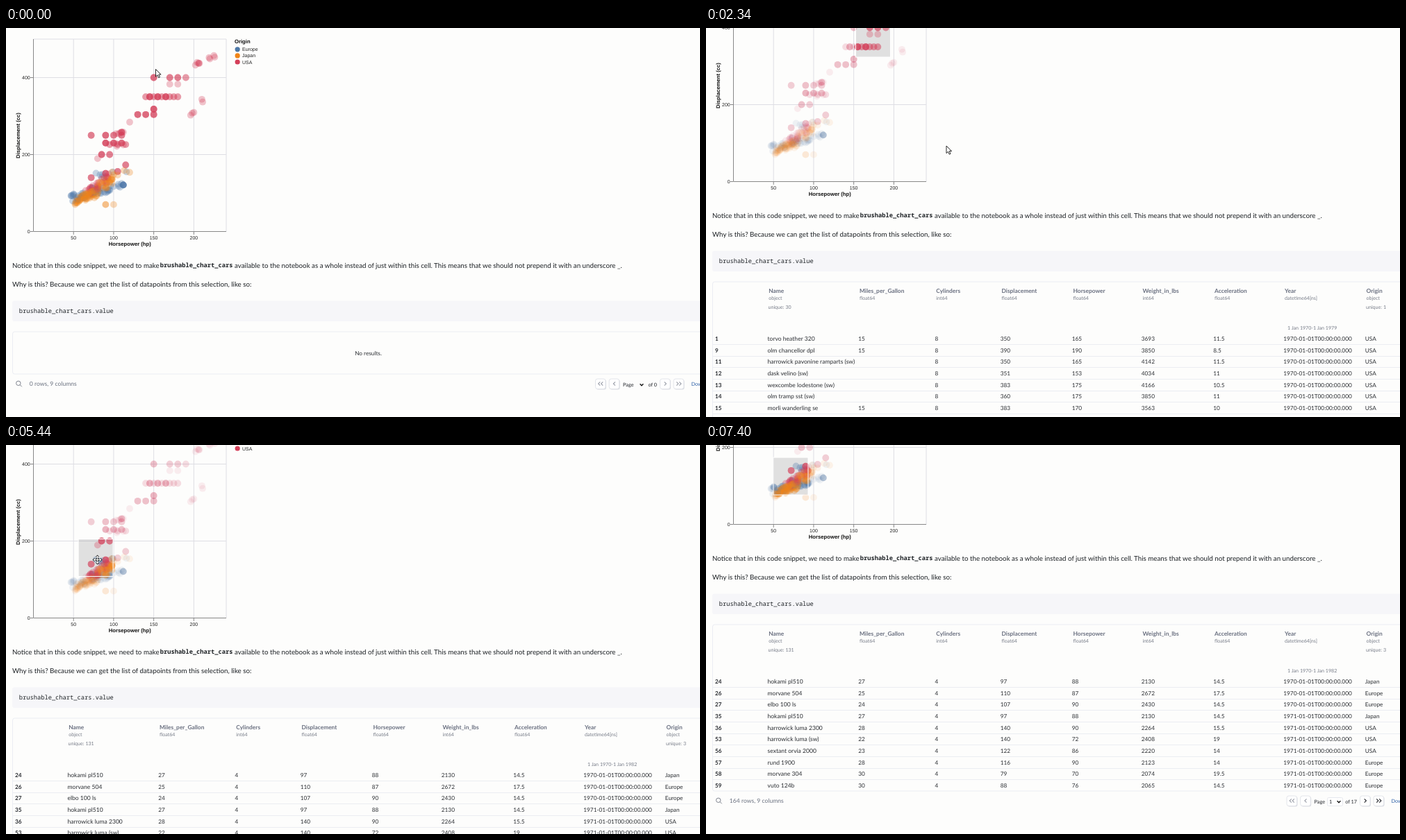
Recreate the animation shown at these times as an HTML page. Size 999 by 561 pixels, loop 7.47 s.

```html
<!DOCTYPE html>
<html lang="en">
<head>
<meta charset="utf-8">
<title>Brushable chart</title>
<style>
  html, body { margin: 0; width: 100%; height: 100%; overflow: hidden; background: #fdfdfc; }
  svg { display: block; }
  text { font-family: Lato, sans-serif; font-size: 8.55px; fill: #2b2e33; white-space: pre; text-rendering: geometricPrecision; }
  .para { font-size: 9.77px; fill: #1c2024; }
  .code { font-family: "Noto Sans Mono", monospace; font-size: 8.72px; fill: #1c2024; }
  .head { font-size: 8.4px; font-weight: bold; fill: #6a7080; }
  .sub { font-size: 7.1px; fill: #777c88; }
  .num { font-size: 8.25px; }
  .bold { font-weight: bold; }
  .foot { font-size: 8.6px; fill: #6b7280; }
  .page { font-size: 7.3px; fill: #22252b; }
  .link { fill: #2f62a8; }
  .axis { font-family: "Liberation Sans", Arial, sans-serif; font-size: 7px; fill: #222; }
  .title { font-family: "Liberation Sans", Arial, sans-serif; font-size: 7.7px; font-weight: bold; fill: #111; }
  .mid { text-anchor: middle; }
  .end { text-anchor: end; }
</style>
</head>
<body>
<svg id="stage" width="999" height="561" viewBox="0 0 999 561"></svg>
<script>
const LOOP = 7470;
const COLORS = { Europe: '#4c78a8', Japan: '#f08519', USA: '#d43f59' };

function el(parent, tag, attrs = {}, text) {
  const node = document.createElementNS('http://www.w3.org/2000/svg', tag);
  for (const key in attrs) node.setAttribute(key, attrs[key]);
  if (text !== undefined) node.textContent = text;
  parent.appendChild(node);
  return node;
}
const label = (parent, x, y, cls, text) => el(parent, 'text', { x, y, class: cls }, text);
const line = (parent, d, stroke, width = 1) =>
  el(parent, 'path', { d, stroke, fill: 'none', 'stroke-width': width });

const stage = document.getElementById('stage');
const page = el(stage, 'g');

// Chart
const px = hp => 39.5 + hp * 1.1545;
const py = cc => 293.5 - cc * 0.555;

for (let hp = 50; hp <= 200; hp += 50) {
  const x = px(hp);
  line(page, `M${x} 16V293`, '#dedee4');
  line(page, `M${x} 294V298`, '#888');
  label(page, x, 304.5, 'axis mid', hp);
}
for (let cc = 0; cc <= 400; cc += 200) {
  const y = py(cc);
  if (cc) line(page, `M40 ${y}H317`, '#dedee4');
  line(page, `M35 ${y}H39`, '#888');
  label(page, 34.7, y + 2.5, 'axis end', cc);
}
line(page, 'M39.5 16H317V293.5', '#dedee4');
line(page, 'M39.5 16V293.5H317', '#888');
label(page, 178.3, 314, 'title mid', 'Horsepower (hp)');
el(page, 'text', { class: 'title mid', transform: 'translate(19.5 155) rotate(-90)' }, 'Displacement (cc)');
label(page, 329, 22.3, 'title', 'Origin');
Object.keys(COLORS).forEach((name, i) => {
  const y = 30.8 + i * 9.1;
  el(page, 'circle', { cx: 333.2, cy: y, r: 3.6, fill: COLORS[name] });
  label(page, 340, y + 2.5, 'axis', name);
});

let seed = 20;
function random() {
  seed = (seed + 0x6d2b79f5) | 0;
  let v = Math.imul(seed ^ (seed >>> 15), 1 | seed);
  v ^= v + Math.imul(v ^ (v >>> 7), 61 | v);
  return ((v ^ (v >>> 14)) >>> 0) / 4294967296;
}

const points = [];
function add(origin, hp, cc) {
  points.push({ origin, x: px(hp), y: py(cc), order: random() + (origin === 'Japan' ? 0.3 : 0) });
}
// Engines of one size, stacked at regular power steps
function band(origin, count, cc, from, to = from) {
  const step = to - from > 25 ? 5 : 10;
  const stops = Math.floor((to - from) / step) + 1;
  for (let i = 0; i < count; i++) add(origin, from + step * (i % stops), cc);
}
// Loose scatter along a rising diagonal
function cloud(origin, count, hp0, hp1, cc0, cc1, spread) {
  for (let i = 0; i < count; i++) {
    const u = random();
    add(origin, Math.round(hp0 + (hp1 - hp0) * u), cc0 + (cc1 - cc0) * u + (random() - 0.5) * spread);
  }
}
cloud('USA', 9, 198, 227, 430, 456, 8);
cloud('USA', 5, 193, 215, 303, 345, 20);
cloud('USA', 9, 80, 125, 195, 268, 50);
cloud('USA', 36, 64, 94, 92, 142, 28);
band('USA', 4, 400, 150);
band('USA', 8, 400, 170, 190);
band('USA', 2, 383, 170, 180);
band('USA', 18, 350, 140, 180);
band('USA', 9, 350, 145, 165);
band('USA', 5, 318, 150);
band('USA', 12, 304, 130, 150);
band('USA', 4, 258, 110);
band('USA', 3, 250, 72);
band('USA', 10, 250, 90, 110);
band('USA', 13, 230, 90, 110);
band('USA', 6, 226, 95, 115);
band('USA', 7, 200, 85, 95);
band('USA', 3, 173, 115);
band('USA', 3, 156, 105);
band('USA', 4, 151, 90);
band('USA', 3, 140, 72);
band('Europe', 6, 121, 112);
cloud('Europe', 22, 46, 82, 88, 100, 20);
cloud('Europe', 20, 70, 112, 98, 126, 28);
cloud('Europe', 6, 67, 133, 143, 166, 16);
band('Japan', 3, 70, 90, 100);
cloud('Japan', 48, 52, 76, 78, 100, 18);
cloud('Japan', 32, 72, 98, 96, 138, 34);
cloud('Japan', 5, 98, 132, 145, 168, 14);
points.sort((a, b) => a.order - b.order);

const brushFill = el(page, 'rect', { fill: '#333', 'fill-opacity': 0.14 });
for (const p of points)
  p.node = el(page, 'circle', { cx: p.x, cy: p.y, r: 4.9, fill: COLORS[p.origin] });
const brushEdge = el(page, 'rect', { fill: 'none', stroke: '#fff' });

// Notebook text
label(page, 9, 345.5, 'para', 'Notice that in this code snippet, we need to make');
label(page, 221.8, 345.3, 'code bold', 'brushable_chart_cars');
label(page, 329, 345.5, 'para', 'available to the notebook as a whole instead of just within this cell. This means that we should not prepend it with an underscore _.');
label(page, 9, 373, 'para', 'Why is this? Because we can get the list of datapoints from this selection, like so:');
el(page, 'rect', { x: 9, y: 393.5, width: 1000, height: 29.5, rx: 3, fill: '#f6f6f9' });
label(page, 18.8, 410.6, 'code', 'brushable_chart_cars.value');

// Table
const COLUMNS = [
  ['Name', 'object', 90.2], ['Miles_per_Gallon', 'float64', 221], ['Cylinders', 'int64', 331.3],
  ['Displacement', 'float64', 425.5], ['Horsepower', 'float64', 528.5], ['Weight_in_lbs', 'int64', 628.5],
  ['Acceleration', 'float64', 732], ['Year', 'datetime64[ns]', 833], ['Origin', 'object', 950.5]
];
const EMPTY = { total: 0, pages: 0 };
// Row text: index, name, mileage, displacement, power, weight, acceleration, origin (USA if absent)
const MUSCLE = {
  total: 44, pages: 5, names: 30, origins: 1, last: 1979, cylinders: 8,
  rows: `1|torvo heather 320|15|350|165|3693|11.5
9|olm chancellor dpl|15|390|190|3850|8.5
11|harrowick pavonine ramparts (sw)||350|165|4142|11.5
12|dask velino (sw)||351|153|4034|11
13|wexcombe lodestone (sw)||383|175|4166|10.5
14|olm tramp sst (sw)||360|175|3850|11
15|morli wanderling se|15|383|170|3563|10
16|wexcombe marl 340|14|340|160|3609|8
18|harrowick sol brava|15|400|170|3761|9.5
33|dask fernhill|14|351|153|4154|13.5`
};
const FAMILY = {
  total: 76, pages: 8, names: 49, origins: 1, last: 1982, cylinders: 6,
  rows: `21|wexcombe sorrel|22|198|95|2833|15.5
22|olm cicada|18|199|97|2774|15.5
23|dask hillfolk|21|200|85|2587|16
30|olm bramble|21|199|90|2648|15
40|olm bramble|19|232|100|2634|13
41|wexcombe lodestone custom|16|225|105|3439|15.5`
};
const COMPACT = {
  total: 164, pages: 17, names: 131, origins: 3, last: 1982, cylinders: 4,
  rows: `24|hokami pl510|27|97|88|2130|14.5|Japan
26|morvane 504|25|110|87|2672|17.5|Europe
27|elbo 100 ls|24|107|90|2430|14.5|Europe
35|hokami pl510|27|97|88|2130|14.5|Japan
36|harrowick luma 2300|28|140|90|2264|15.5
53|harrowick luma (sw)|22|140|72|2408|19
56|sextant orvia 2000|23|122|86|2220|14
57|rund 1900|28|116|90|2123|14|Europe
58|morvane 304|30|79|70|2074|19.5|Europe
59|vuto 124b|30|88|76|2065|14.5|Europe`
};

const table = el(page, 'g');

function button(parent, x, dir, double, on) {
  el(parent, 'rect', { x: x - 6.5, y: 507, width: 14.5, height: 14.5, rx: 3, fill: '#d9dbe2' });
  el(parent, 'rect', { x: x - 7.5, y: 506, width: 14.5, height: 14.5, rx: 3, fill: '#fff', stroke: '#e3e5ea' });
  for (const dx of double ? [-2, 2] : [0])
    line(parent, `M${x + dx - dir * 1.3} 510.3l${dir * 2.7} 2.7l${-dir * 2.7} 2.7`, on ? '#22252b' : '#9a9ea8', 1.1);
}

function drawFooter(data) {
  const full = data.total > 0;
  const g = el(table, 'g', { transform: `translate(0 ${full ? 179 : 0})` });
  const shift = full ? 4.5 + 4 * String(data.pages).length : 0;
  el(g, 'circle', { cx: 17.8, cy: 512.3, r: 3.2, fill: 'none', stroke: '#7c818c' });
  line(g, 'M20.2 514.7L22.8 517.3', '#7c818c');
  label(g, 33.8, 516, 'foot', `${data.total} rows, 9 columns`);
  button(g, 856 - shift, -1, true, false);
  button(g, 875.7 - shift, -1, false, false);
  label(g, 888 - shift, 516.6, 'page', 'Page');
  if (full) {
    const x = 906.5 - shift;
    el(g, 'rect', { x: x + 0.5, y: 508.5, width: 22, height: 12, rx: 2, fill: '#fff', stroke: '#e6e8ee' });
    label(g, x + 3, 517.4, 'page', '1');
  }
  line(g, `M${(full ? 923.5 - shift : 915) - 2.4} 513.3l2.4 2.4l2.4 -2.4`, '#111', 1.4);
  label(g, 937, 516.6, 'page end', `of ${data.pages}`);
  button(g, 949, 1, false, full);
  button(g, 968.5, 1, true, full);
  label(g, 986.5, 515.6, 'page link', 'Download');
}

function drawTable(data) {
  table.replaceChildren();
  const full = data.total > 0;
  el(table, 'rect', { x: 9.5, y: 438, width: 1010, height: full ? 240 : 61, rx: 3, fill: 'none', stroke: '#ebedf3' });
  drawFooter(data);
  if (!full) {
    label(table, 521.5, 471.8, 'num mid', 'No results.');
    return;
  }
  for (const [name, type, x] of COLUMNS) {
    label(table, x, 453.5, 'head', name);
    label(table, x, 463.7, 'sub', type);
  }
  label(table, 89.5, 476.8, 'sub', `unique: ${data.names}`);
  label(table, 950, 476.8, 'sub', `unique: ${data.origins}`);
  label(table, 837, 506.8, 'sub', `1 Jan 1970-1 Jan ${data.last}`);
  data.rows.split('\n').forEach((row, i) => {
    const y = 523 + i * 16.65;
    const [index, name, mileage, cc, hp, weight, pace, origin = 'USA'] = row.split('|');
    const date = `${index > 30 ? 1971 : 1970}-01-01T00:00:00.000`;
    label(table, 13, y, 'num bold', index);
    [name, mileage, data.cylinders, cc, hp, weight, pace, date, origin].forEach((cell, c) =>
      label(table, COLUMNS[c][2] - 1.7, y, c ? 'num' : '', cell));
    if (i < 9) line(table, `M10 ${Math.floor(y + 5.5) + 0.5}H999`, '#ebedf2');
  });
}

// Pointers
const arrow = el(stage, 'path', {
  d: 'M0 0V10.6L2.5 8.3L4.2 12.2L6 11.4L4.3 7.6H7.6Z', fill: '#fff', stroke: '#111', 'stroke-width': 0.9
});
const mover = el(stage, 'g');
for (const [color, width] of [['#222', 2.8], ['#fff', 1.1]])
  for (let angle = 0; angle < 360; angle += 90)
    line(mover, 'M0 0H5M3.4 -1.6L5 0L3.4 1.6', color, width).setAttribute('transform', `rotate(${angle})`);

// Motion: each move is a start, an end and the values it reaches
const SCROLL = [[1900, 2150, 67.5], [2305, 2600, 179], [2800, 3050, 44], [6193, 6600, 179]];
const GROW = [[370, 1200, 50, 54]];
const DRAG = [[3280, 3340, 212.5, 64], [3340, 4300, 120, 140.5], [5000, 5700, 97, 197]];
const POINTER = [
  [370, 1200, 263, 111], [1600, 1900, 346, 170], [2950, 3280, 243, 46],
  ...DRAG.map(([start, end, x, y]) => [start, end, x + 27.5, y - 14]),
  [5800, 6150, 258.5, 221.5], [6500, 6900, 420, 600]
];
const TABLES = [[0, EMPTY], [700, MUSCLE], [3900, FAMILY], [5350, COMPACT]];

function at(t, values, moves) {
  for (const [start, end, ...goal] of moves) {
    if (t <= start) break;
    const u = Math.min(1, (t - start) / (end - start));
    const ease = u * u * (3 - 2 * u);
    values = values.map((v, i) => v + (goal[i] - v) * ease);
  }
  return values;
}

let shownTable, shownBrush;

function drawBrush(active, x, y, width, height) {
  const id = [active, x, y, width, height].join();
  if (id === shownBrush) return;
  shownBrush = id;
  for (const rect of [brushFill, brushEdge]) {
    rect.style.display = active ? '' : 'none';
    Object.entries({ x, y, width, height }).forEach(([k, v]) => rect.setAttribute(k, v));
  }
  for (const p of points) {
    const inside = p.x >= x && p.x <= x + width && p.y >= y && p.y <= y + height;
    p.node.setAttribute('fill-opacity', !active || inside ? 0.3 : 0.085);
  }
}

function render(t) {
  const data = TABLES.filter(step => step[0] <= t).pop()[1];
  if (data !== shownTable) drawTable(shownTable = data);

  const scroll = Math.round(at(t, [0], SCROLL)[0]);
  page.setAttribute('transform', `translate(0 ${-scroll})`);

  const active = t > 380;
  const [bx, by] = at(t, [215.5, 60], DRAG);
  const [bw, bh] = at(t, [0, 0], GROW);
  drawBrush(active, bx, by, bw, bh);

  const [x, y] = at(t, [215.5, 59.5], POINTER);
  const over = active && x > bx && x < bx + bw && y + scroll > by && y + scroll < by + bh;
  arrow.style.display = over ? 'none' : '';
  mover.style.display = over ? '' : 'none';
  (over ? mover : arrow).setAttribute('transform', `translate(${x} ${y})`);
}

const start = performance.now();
function tick() {
  render((performance.now() - start) % LOOP);
  requestAnimationFrame(tick);
}
tick();
</script>
</body>
</html>
```
